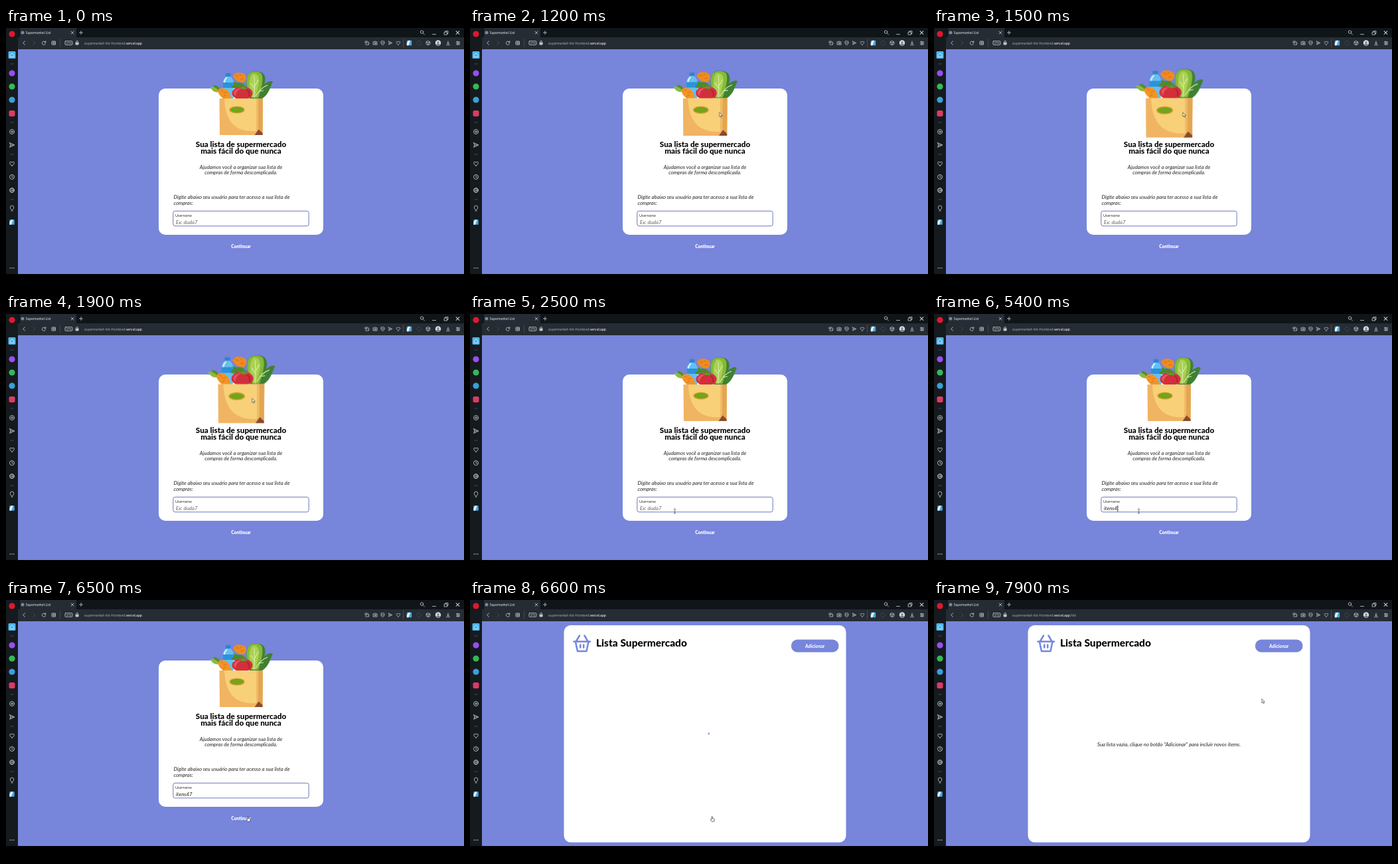
An HTML page for the animation above (8 s loop, 690 by 388 pixels).

```html
<!DOCTYPE html>
<html lang="pt">
<head>
<meta charset="utf-8">
<title>Supermarket List</title>
<style>
  html, body { margin: 0; width: 100%; height: 100%; overflow: hidden; background: #000; }
  svg { display: block; width: 690px; height: 388px; }
  text { font-family: Lato, sans-serif; }
  .ui { font-family: "Open Sans", sans-serif; }
  .bold { font-weight: 800; }
  .it { font-style: italic; font-size: 7.8px; fill: #222; }
  .mid { text-anchor: middle; }
  .icon { fill: none; stroke: #c3c8ce; stroke-width: .85; stroke-linecap: round; stroke-linejoin: round; }
  .dim { stroke: #4a5159; }
  .off { display: none; }
  #bag { transform-origin: 354px 113.5px; }
</style>
</head>
<body>
<svg viewBox="0 0 690 388">
  <defs>
    <path id="heart" d="M0 3C-5 -.5-3-4 0-1.6C3-4 5-.5 0 3Z"/>
    <path id="send" d="M-3-3L3.5 0L-3 3L-2 0ZM-2 0H1"/>
    <path id="cross" d="M-2-2L2 2M2-2L-2 2"/>
    <path id="leaf" d="M0 0C-5-2-7-7-4-12C1-9 3-4 0 0Z"/>
    <g id="map">
      <rect x="-3.7" y="-3.7" width="7.4" height="7.4" rx=".8" fill="#49a8e6"/>
      <path d="M-3.7 3.7V0L-1-3.7H1.5L-1 3.7Z" fill="#e9f1f5"/>
    </g>
  </defs>

  <!-- page -->
  <rect x="18" y="32" width="672" height="338" fill="#7785db"/>

  <g id="login">
    <rect x="230" y="91" width="248" height="220" rx="10" fill="#fff"/>
    <g id="bag">
      <!-- lettuce -->
      <path d="M367 106C362 92 360 79 365 70C369 64 380 64 387 68C392 73 391 81 389 85C394 80 400 79 402 81C398 88 397 99 386 106Z" fill="#3f8132"/>
      <path d="M370 105C362 91 360 77 366 69C372 64 381 65 385 69C389 77 384 93 380 105Z" fill="#86b93b"/>
      <path d="M371 104C365 90 365 76 371 69C377 67 382 72 381 81C380 91 377 98 375 105Z" fill="#a9d052"/>
      <path d="M374 104Q375 88 374 72M375 92L369 83M375 87L380 78M376 103Q383 90 394 86M382 95L388 94" fill="none" stroke="#d9edaa" stroke-width="1.1"/>
      <!-- carrots -->
      <g fill="#6fa52f">
        <use href="#leaf" transform="translate(323 94) rotate(-62)"/>
        <use href="#leaf" transform="translate(322 95) rotate(-25)" fill="#4f8f2c"/>
        <use href="#leaf" transform="translate(321 96) rotate(-48) scale(.9 1.25)" fill="#8bbb3d"/>
        <use href="#leaf" transform="translate(352 88) rotate(-40)" fill="#4f8f2c"/>
      </g>
      <path d="M342 72C346 65 355 66 361 71C363 75 361 80 357 82C350 82 344 78 342 72Z" fill="#ef8b21"/>
      <path d="M346 71L351 73M352 69L355 72M353 77L358 76" stroke="#c96716" stroke-width=".8"/>
      <!-- bottle -->
      <rect x="331" y="68" width="7.5" height="5" rx="1" fill="#2f83cf"/>
      <path d="M331.5 73H338Q343 77 342.5 82V106H326.500V82Q327 77 331.500 73Z" fill="#65c0ee"/>
      <path d="M326.500 82H342.500V90H326.500Z" fill="#2b92db"/>
      <path d="M332 74H334Q330 79 330 82H328Q328 77 332 74Z" fill="#d9f2fd"/>
      <path d="M319 95C320 90 328 89 333 93C337 97 339 102 339 106H327C323 103 320 99 319 95Z" fill="#f39325"/>
      <path d="M323 93L327 95M328 98L333 96M327 103L331 101" stroke="#cc6a17" stroke-width=".8"/>
      <!-- pepper leaves and tomato -->
      <path d="M339 90Q343 82 352 82Q360 83 362 90Z" fill="#4c8c2d"/>
      <ellipse cx="356" cy="98" rx="15.500" ry="10" fill="#d22f3d"/>
      <path d="M343 98C344 92 350 90 354 91C348 94 346 98 346 103Z" fill="#e7545a"/>
      <path d="M356 92L348 88L355 89L358 86L359 89L365 90L360 92Z" fill="#63992d"/>
      <path d="M363 93Q368 97 366 103" fill="none" stroke="#a51e30" stroke-width="1.3"/>
      <!-- paper -->
      <path d="M321.500 106H387L386.500 161H322Z" fill="#f0b462"/>
      <path d="M329 106H377V155C351 157 330 146 329 106Z" fill="#f8d078"/>
      <path d="M377 106H387L386.500 161L377 153Z" fill="#e4a551"/>
      <path d="M377 106H380V153L377 156Z" fill="#efbb67"/>
      <path d="M374.500 161L380.500 152.500L386.500 158V161Z" fill="#8b4a2c"/>
      <ellipse cx="348" cy="123" rx="11" ry="5" fill="#76a31c" stroke="#dba032" stroke-width="1.200"/>
    </g>
    <g class="bold mid" font-size="11.7">
      <text x="354" y="179">Sua lista de supermercado</text>
      <text x="354" y="189">mais fácil do que nunca</text>
    </g>
    <text class="it mid" x="354" y="211.500">Ajudamos você a organizar sua lista de</text>
    <text class="it mid" x="354" y="220">compras de forma descomplicada.</text>
    <text class="it" x="252.500" y="257.300">Digite abaixo seu usuário para ter acesso a sua lista de</text>
    <text class="it" x="252.500" y="266">compras:</text>
    <rect x="251.800" y="275.300" width="204.400" height="22.500" rx="3" fill="#fff" stroke="#5f68b5" stroke-width=".9"/>
    <text x="255" y="283.600" font-size="5.6" fill="#333">Username</text>
    <text id="hint" class="it" x="256" y="295" style="fill:#666">Ex: duda7</text>
    <text id="typed" class="it" x="256" y="295"></text>
    <rect id="caret" y="288" width=".9" height="9" fill="#111"/>
    <text class="mid" x="354" y="330.500" font-size="6.6" font-weight="900" fill="#fff">Continuar</text>
  </g>

  <g id="list">
    <rect x="141.500" y="38" width="425" height="326.500" rx="10" fill="#fff"/>
    <g fill="none" stroke="#7785db" stroke-width="2.500" stroke-linecap="round" stroke-linejoin="round">
      <path d="M156.500 62.500H181M159 63L162 77H175.500L178.500 63M160 62L165 53.500M177.500 62L172.500 53.500M166.300 67.500V71.500M171.200 67.500V71.500"/>
    </g>
    <text class="bold" x="190" y="70.300" font-size="15.500">Lista Supermercado</text>
    <rect x="483.800" y="59.500" width="71.800" height="19" rx="9.500" fill="#7785db"/>
    <text class="bold mid" x="519.700" y="71.500" font-size="6.800" fill="#fff">Adicionar</text>
    <g id="loader" transform="translate(354 217) scale(.84)">
      <g id="spin">
        <circle id="ring" r="20.200" transform="rotate(-90)" fill="none" stroke="#7785db" stroke-width="3.600"/>
      </g>
    </g>
    <text id="empty" class="it mid" x="354" y="219.800">Sua lista vazia, clique no botão "Adicionar" para incluir novos items.</text>
  </g>

  <!-- browser -->
  <rect width="690" height="14" fill="#10151a"/>
  <rect width="18" height="370" fill="#151a1f"/>
  <path d="M18 32V14H21V0H106V14H690V32Z" fill="#262c34"/>
  <rect y="370" width="690" height="18"/>
  <circle cx="25" cy="7" r="2.500" fill="#6d8ea3"/>
  <g class="ui">
    <text x="29.800" y="9" font-size="5.100" fill="#e3e6e9">Supermarket List</text>
    <text x="118" y="24.700" font-size="5.450" fill="#a4abb3">supermarket-list-frontend.<tspan fill="#fff">vercel.app</tspan><tspan id="route">/list</tspan></text>
    <text class="mid" x="94.600" y="24.200" font-size="4" fill="#b9bec4">VPN</text>
  </g>
  <g class="icon">
    <use href="#cross" x="100" y="7"/>
    <path d="M113 4.500V9.500M110.500 7H115.500"/>
    <circle cx="626.500" cy="6" r="2.200"/><path d="M628.200 7.700L630.500 10"/>
    <path d="M642.500 9.500H647.500M660.500 6H664.500V10H660.500ZM662 6V4.500H666V8.500H664.500"/>
    <use href="#cross" transform="translate(680.500 7) scale(1.200)"/>
    <path d="M28.500 19.800L25.500 22.500L28.500 25.200"/>
    <path class="dim" d="M41 19.800L44 22.500L41 25.200"/>
    <path d="M59.500 21.500A2.700 2.700 0 1 0 59.600 23.600M59.800 19.700V21.700H57.800"/>
    <path d="M69.500 20H74.500V25H69.500ZM72 20V25M69.500 22.500H74.500"/>
    <path class="dim" d="M81.700 16.500V28.500M598.500 16.500V28.500"/>
    <rect x="89" y="19.700" width="11" height="5.600" rx="1"/>
    <path d="M105.700 22V20.800A1.500 1.500 0 0 1 108.700 20.800V22"/>
    <rect x="105.300" y="22" width="3.800" height="3" fill="#c3c8ce"/>
    <path d="M541.500 20H544V22.500H541.500ZM541.500 25H546.500V22.500M545 20L547 22"/>
    <path d="M553.500 20.800H555L555.500 20H557L557.500 20.800H559V25H553.500Z"/><circle cx="556.200" cy="22.800" r="1"/>
    <path d="M567.500 19.700L570 20.500V23Q569.500 24.700 567.500 25.500Q565.500 24.700 565 23V20.500ZM566.500 22.500H568.500"/>
    <use href="#send" transform="translate(579 22.500) scale(.85)"/>
    <use href="#heart" transform="translate(591 22.500) scale(.9)"/>
    <circle class="dim" cx="622" cy="22.500" r="3" stroke-dasharray="1.500 1.500"/>
    <path d="M636 19.500L638.800 21V24.200L636 25.700L633.200 24.200V21ZM633.200 21L636 22.500L638.800 21M636 22.500V25.700"/>
    <path d="M666 19.800V23.800M664.300 22.300L666 23.900L667.700 22.300M663.500 25.400H668.500"/>
    <path d="M678.500 20.700H683.500M678.500 22.700H683.500M678.500 24.700H683.500M680 20V21.400M682 22V23.400M680.500 24V25.400"/>
    <!-- sidebar -->
    <path class="dim" d="M7 54H11.500M7 142H11.500M7 190H11.500M7 258H11.500"/>
    <circle cx="9" cy="156" r="3.500"/><circle cx="9" cy="156" r="1.300"/>
    <use href="#send" transform="translate(9 176) scale(1.100)"/>
    <use href="#heart" transform="translate(9 204) scale(1.100)"/>
    <circle cx="9" cy="224" r="3.500"/><path d="M9 222V224.200L10.500 225"/>
    <circle cx="9" cy="244" r="2.900"/><circle cx="9" cy="244" r="1"/>
    <circle cx="9" cy="244" r="3.500" stroke-dasharray="1.400 1.350"/>
    <path d="M7.800 273.200Q6 271.500 6.300 269.800A2.700 2.700 0 0 1 11.700 269.800Q12 271.500 10.200 273.200ZM8 275H10"/>
  </g>
  <use href="#map" x="607.500" y="22.500"/>
  <use href="#map" x="9" y="292"/>
  <circle cx="651" cy="22.500" r="4.200" fill="#d9dde2"/>
  <path d="M648 25.300Q648.500 23.300 651 23.300Q653.500 23.300 654 25.300Q651 28 648 25.300Z" fill="#747c86"/>
  <circle cx="651" cy="21.400" r="1.500" fill="#747c86"/>
  <circle cx="9" cy="9" r="4.600" fill="#e0182d"/>
  <rect x="3.500" y="35" width="11" height="11" rx="1.500" fill="#4fb4ea"/>
  <path d="M6 40.500L9 37.800L12 40.500V43.500H6Z" fill="none" stroke="#d9f1fc" stroke-width=".8"/>
  <circle cx="9" cy="68" r="4.600" fill="#9a4df2"/>
  <circle cx="9" cy="88" r="4.600" fill="#35b955"/>
  <circle cx="9" cy="108" r="4.600" fill="#38a1d8"/>
  <rect x="4.500" y="124" width="9" height="9" rx="2.200" fill="#dd3b63"/>
  <g fill="#c3c8ce"><circle cx="6.300" cy="361" r=".8"/><circle cx="9" cy="361" r=".8"/><circle cx="11.700" cy="361" r=".8"/></g>

  <!-- pointer -->
  <g id="pointer">
    <path id="arrow" d="M0 0V6.300L1.500 5L2.500 7.300L3.600 6.800L2.600 4.600H4.500Z" fill="#fff" stroke="#222" stroke-width=".6"/>
    <path id="beam" d="M-1.300 0H1.300M0 0V6.500M-1.300 6.500H1.300" fill="none" stroke="#222" stroke-width=".7"/>
    <path id="hand" d="M-.8 4.500V.6Q0-.4.700.6V3L3 3.600Q3.700 4 3.500 5L3 7.700H-.5L-2.500 5.200Q-2.300 4-.8 4.500Z" fill="#fff" stroke="#222" stroke-width=".7"/>
  </g>
</svg>
<script>
const LOOP = 8000, TICK = 100, SPIN = 1400;
const OPEN = 6600, READY = 7500;
const $ = id => document.getElementById(id);
const show = (id, on) => $(id).classList.toggle('off', !on);
const between = (t, a, b) => t >= a && t < b;

const tracks = [];
function track(id, steps, toFrame) {
  const frames = steps.map(([ms, ...v]) => ({ offset: ms / LOOP, ...toFrame(...v) }));
  const anim = $(id).animate(frames, { duration: LOOP, fill: 'both' });
  anim.pause();
  tracks.push(anim);
}

track('pointer', [
  [0, 631, 148], [600, 631, 148], [800, 545, 167], [1000, 432, 150], [1100, 388, 131],
  [1200, 375.7, 127], [1800, 374, 127], [1900, 370.7, 126.800], [2000, 355, 165], [2100, 333, 225],
  [2200, 315, 272], [2300, 308.300, 287], [2400, 308.300, 287], [2500, 308.500, 293.300],
  [5800, 308.500, 293.300], [6000, 328, 314], [6300, 361, 326], [6400, 364.700, 325.500],
  [7700, 364.700, 325.500], [7800, 432, 230], [7900, 493.700, 148.500], [8000, 493.700, 148.500]
], (x, y) => ({ transform: `translate(${x}px, ${y}px)` }));

track('bag', [
  [0, 1], [1100, 1], [1200, 1.021], [1400, 1.067], [1700, 1.1], [1900, 1.066], [2200, 1], [8000, 1]
], s => ({ transform: `scale(${s})` }));

// Indeterminate ring: the arc grows while the whole turns
const spinner = [
  $('spin').animate({ transform: ['rotate(0deg)', 'rotate(360deg)'] }, SPIN),
  $('ring').animate([
    { strokeDasharray: '1px 200px', strokeDashoffset: '0px', easing: 'ease-in-out' },
    { strokeDasharray: '100px 200px', strokeDashoffset: '-15px', easing: 'ease-in-out' },
    { strokeDasharray: '100px 200px', strokeDashoffset: '-125px' }
  ], SPIN)
];
spinner.forEach(a => a.pause());

const word = 'itens47';
const keys = [4100, 4300, 4500, 4800, 4900, 5400, 5500];

function draw(t) {
  for (const a of tracks) a.currentTime = t;
  for (const a of spinner) a.currentTime = Math.max(0, t - OPEN + 60) % SPIN;

  const typed = $('typed');
  typed.textContent = word.slice(0, keys.filter(k => t >= k).length);
  show('hint', t < keys[0]);
  show('caret', between(t, 2700, 3200) || between(t, 3700, 6000));
  $('caret').setAttribute('x', 256 + (typed.textContent ? typed.getComputedTextLength() + .4 : 0));

  show('login', t < OPEN);
  show('list', t >= OPEN);
  show('loader', t < READY);
  show('empty', t >= READY);
  show('route', t >= OPEN + 100);

  const beam = between(t, 2500, 5900), hand = between(t, 6300, 7800);
  show('pointer', t >= 600);
  show('beam', beam);
  show('hand', hand);
  show('arrow', !beam && !hand);
}

const start = performance.now();
function loop() {
  const t = (performance.now() - start) % LOOP;
  draw(Math.floor(t / TICK) * TICK);
  requestAnimationFrame(loop);
}
loop();
</script>
</body>
</html>
```
